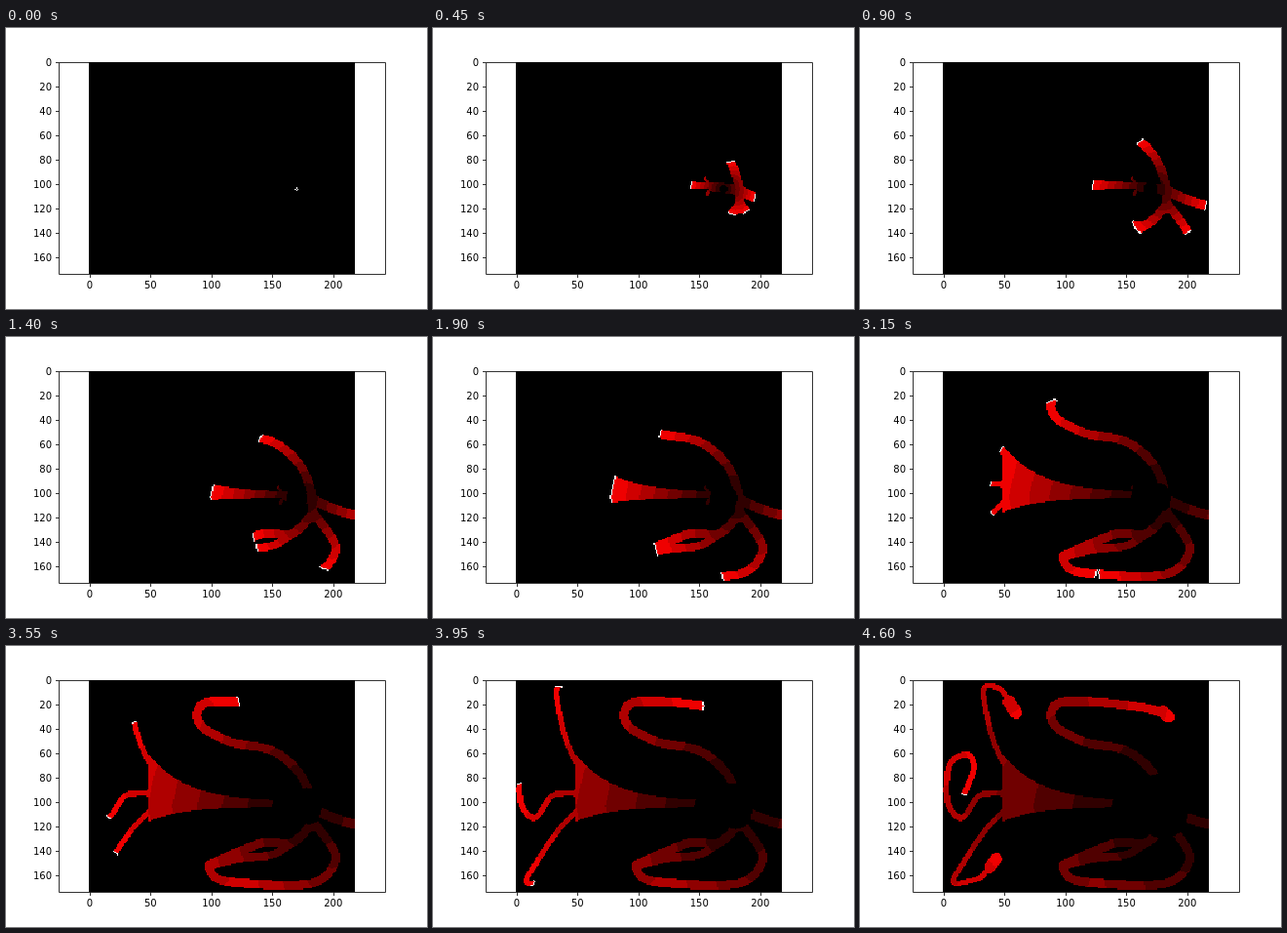
Recreate the animation shown at these times as an HTML page with a canvas. Size 432 by 288 pixels, loop 4.65 s.

```html
<!DOCTYPE html>
<html lang="en">
<head>
<meta charset="utf-8">
<title>Wavefront</title>
<style>
  html, body { margin: 0; width: 100%; height: 100%; overflow: hidden; background: #fff; }
  canvas, svg { position: absolute; left: 0; top: 0; width: 432px; height: 288px; }
  text { font: 10px "DejaVu Sans", sans-serif; fill: #000; }
</style>
</head>
<body>
<canvas id="view" width="432" height="288"></canvas>
<svg id="axes" viewBox="0 0 432 288"></svg>
<script>
const STEP = 50, STEPS = 93, LEVELS = 8;
const COLS = 218, ROWS = 174, CELL = 1.2497, LEFT = 85.2, TOP = 34.56;
const IMG = { x: 85, y: 35, w: 273, h: 217 };

// Stroke width, then the points of a smooth centre line.
const limbs = [
  [10, 288,163, 312,166, 336,176, 360,183],
  [9, 314,185, 313,158, 301,130, 273,107, 230,98, 199,80, 201,60, 230,57, 290,63, 316,70],
  [9, 315,180, 338,214, 324,239, 290,245, 222,240, 208,226],
  [9, 314,182, 293,202, 262,202, 209,224],
  [8, 306,192, 276,213, 243,217, 214,224],
  [5.5, 146,118, 139,102, 133,84, 127,44, 144,44, 152,56],
  [5.5, 147,170, 130,187, 107,221, 96,242, 122,238, 131,228],
  [6, 150,151, 123,153, 105,176, 90,160, 92,122, 110,111, 117,125, 107,152],
  [3, 279,154, 284,163, 281,171]
];
const bulbs = [
  [13, 153,57, 160,68],
  [12, 133,227, 140,218],
  [12, 311,67, 317,73]
];
// Step at which the wave passes a point.
const passes = [
  [11, 258,161], [18, 240,160], [38, 184,156], [50, 158.5,152],
  [63, 135,151], [79, 90,142], [92, 107,151]
];

const cellAt = (x, y) => Math.floor((y - TOP) / CELL) * COLS + Math.floor((x - LEFT) / CELL);

function strokeSpline(g, [width, ...list]) {
  const last = list.length / 2 - 1;
  const at = i => {
    const k = 2 * Math.min(last, Math.max(0, i));
    return [list[k], list[k + 1]];
  };
  // Control point beside point i, along its tangent.
  const control = (i, side) => at(i).map((v, k) => v + side * (at(i + 1)[k] - at(i - 1)[k]) / 6);
  g.beginPath();
  g.moveTo(...at(0));
  for (let i = 0; i < last; i++)
    g.bezierCurveTo(...control(i, 1), ...control(i + 1, -1), ...at(i + 1));
  g.lineWidth = width;
  g.stroke();
}

function fillCone(g) {
  for (let x = 146; x < 292; x++) {
    const half = 2.2 + 31 * Math.exp((147 - x) / 38);
    const mid = 162 - 15 * Math.exp((150 - x) / 40);
    g.fillRect(x, mid - half, 1.5, 2 * half);
  }
}

function makeMask() {
  const c = document.createElement('canvas');
  c.width = COLS;
  c.height = ROWS;
  const g = c.getContext('2d');
  g.scale(1 / CELL, 1 / CELL);
  g.translate(-LEFT, -TOP);
  g.lineCap = g.lineJoin = 'round';
  [...limbs, ...bulbs].forEach(limb => strokeSpline(g, limb));
  fillCone(g);
  const { data } = g.getImageData(0, 0, COLS, ROWS);
  return Array.from({ length: COLS * ROWS }, (_, i) => data[4 * i + 3] > 127);
}

// Near-Euclidean distance inside the mask.
function measure(mask, start) {
  const moves = [];
  for (let dy = -2; dy <= 2; dy++)
    for (let dx = -2; dx <= 2; dx++) {
      const n = dx * dx + dy * dy;
      if (n === 1 || n === 2 || n === 5) moves.push([dx, dy, Math.sqrt(n)]);
    }
  const dist = new Float64Array(COLS * ROWS).fill(Infinity);
  dist[start] = 0;
  const queue = [start];
  for (let q = 0; q < queue.length; q++) {
    const i = queue[q], x = i % COLS, y = Math.floor(i / COLS);
    for (const [dx, dy, len] of moves) {
      const nx = x + dx, ny = y + dy, j = ny * COLS + nx;
      if (nx < 0 || ny < 0 || nx >= COLS || ny >= ROWS || !mask[j]) continue;
      if (dist[i] + len < dist[j] - 1e-9) {
        dist[j] = dist[i] + len;
        queue.push(j);
      }
    }
  }
  return dist;
}

const dist = measure(makeMask(), 104 * COLS + 170);
const keys = [[0, 0], ...passes.map(([s, x, y]) => [s, dist[cellAt(x, y)]])];

function frontAt(step) {
  const i = Math.max(1, keys.findIndex(k => k[0] >= step));
  const [s0, d0] = keys[i - 1], [s1, d1] = keys[i];
  return d0 + (d1 - d0) * (step - s0) / (s1 - s0);
}

const ctx = document.getElementById('view').getContext('2d');
const image = ctx.createImageData(IMG.w, IMG.h);
const pixels = new Uint32Array(image.data.buffer);
const cells = Array.from(pixels, (_, i) =>
  cellAt(IMG.x + i % IMG.w + 0.5, IMG.y + Math.floor(i / IMG.w) + 0.5));

const BLACK = 0xff000000, WHITE = 0xffffffff;

function shade(d, front) {
  if (d > front + 1) return BLACK;
  if (d > front) return WHITE;
  const level = Math.min(LEVELS - 1, Math.floor(d / Math.max(front, 1) * LEVELS));
  return level ? BLACK + Math.round((level + 0.5) / LEVELS * 255) : BLACK;
}

function draw(step) {
  const front = frontAt(step);
  for (let i = 0; i < pixels.length; i++) pixels[i] = shade(dist[cells[i]], front);
  ctx.putImageData(image, IMG.x, IMG.y);
}

function drawAxes() {
  const snap = v => Math.floor(v + 0.5) + 0.5;
  let path = 'M54.5 35.5H389.5V252.5H54.5Z', labels = '';
  for (let v = 0; v <= 200; v += 50) {
    const x = LEFT + (v + 0.5) * CELL;
    path += `M${snap(x)} 252.5v3.5`;
    labels += `<text x="${x}" y="267" text-anchor="middle">${v}</text>`;
  }
  for (let v = 0; v <= 160; v += 20) {
    const y = TOP + (v + 0.5) * CELL;
    path += `M54.5 ${snap(y)}h-3.5`;
    labels += `<text x="47" y="${Math.round(y + 3.8)}" text-anchor="end">${v}</text>`;
  }
  document.getElementById('axes').innerHTML =
    `<path d="${path}" fill="none" stroke="#000" stroke-width="0.8"/>${labels}`;
}

drawAxes();
let shown = -1;
const begin = performance.now();
function tick() {
  const step = Math.floor(Math.max(0, performance.now() - begin) / STEP) % STEPS;
  if (step !== shown) draw(shown = step);
  requestAnimationFrame(tick);
}
tick();
</script>
</body>
</html>
```
